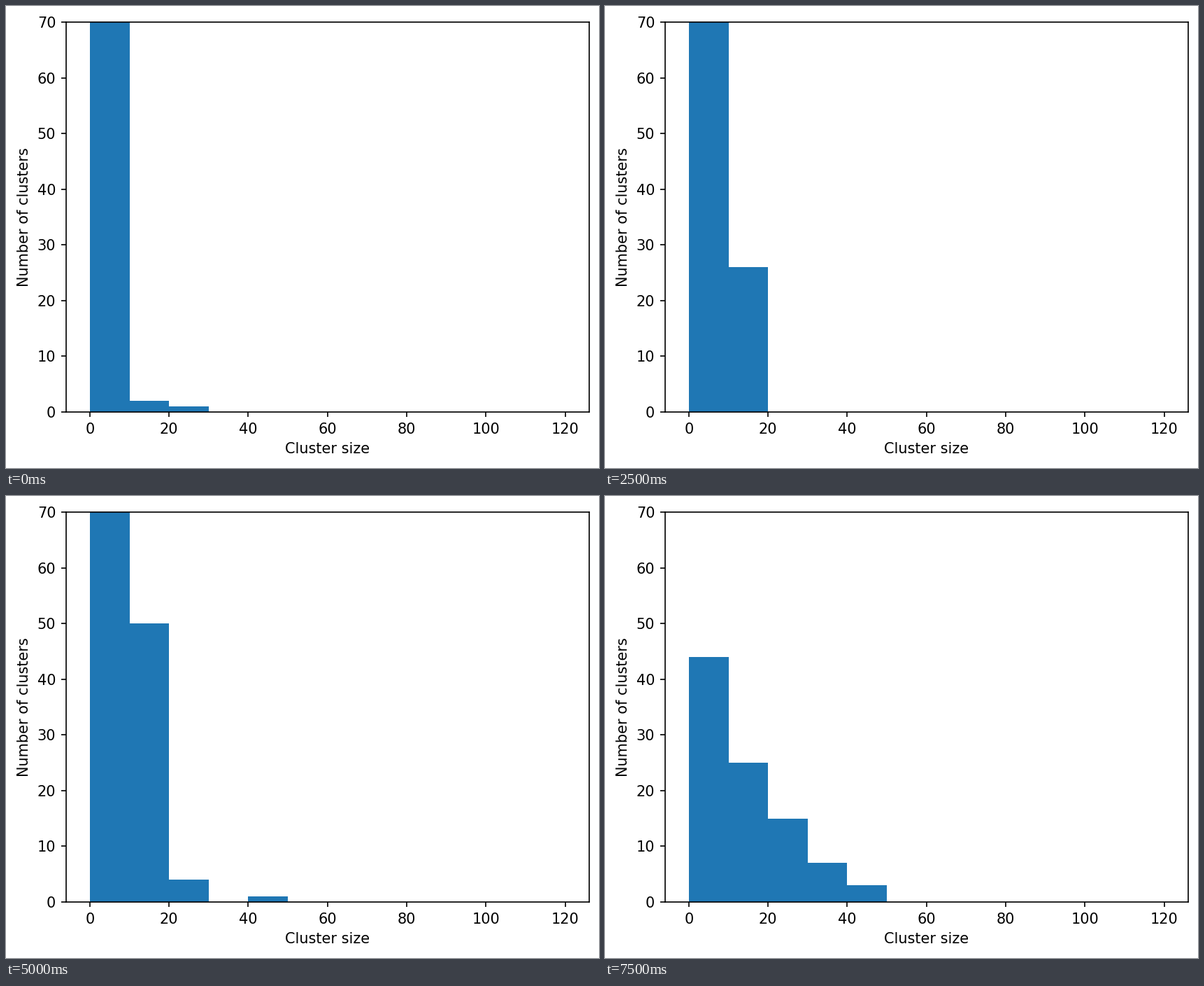
A matplotlib script for the animation above (8000 ms loop, 848 px wide and 660 px high).

```python
import matplotlib.pyplot as plt
from matplotlib.animation import FuncAnimation

W, H, DPI = 848, 660, 128
STEP_MS = 500
BIN = 10
FULL = 80  # taller than the axis, so the bar is clipped

# Cluster counts per bin (0-10, 10-20, ...), one row per step
COUNTS = [
    (FULL, 2, 1, 0, 0),
    (FULL, 7, 0, 0, 0),
    (FULL, 6, 0, 0, 0),
    (FULL, 13, 0, 0, 0),
    (FULL, 20, 0, 0, 0),
    (FULL, 26, 0, 0, 0),
    (FULL, 40, 2, 0, 0),
    (FULL, 38, 4, 0, 0),
    (FULL, 49, 1, 1, 0),
    (FULL, 52, 2, 0, 0),
    (FULL, 50, 4, 0, 1),
    (FULL, 53, 5, 1, 0),
    (65, 44, 9, 3, 2),
    (56, 36, 13, 5, 1),
    (44, 32, 14, 6, 2),
    (44, 25, 15, 7, 3),
]

K = 150.7 / DPI  # scale of text and line widths
plt.rcParams.update({
    "font.family": "DejaVu Sans",
    "font.size": 10 * K,
    "axes.linewidth": 0.8 * K,
    "axes.labelpad": 4 * K,
})
for axis in ("xtick", "ytick"):
    plt.rcParams.update({
        f"{axis}.major.size": 3.5 * K,
        f"{axis}.major.width": 0.8 * K,
        f"{axis}.major.pad": 3.5 * K,
    })

fig = plt.figure(figsize=(W / DPI, H / DPI), dpi=DPI, facecolor="white")
left, right, top, bottom = 86, 833.5, 23, 580
ax = fig.add_axes([left / W, 1 - bottom / H,
                   (right - left) / W, (bottom - top) / H])
ax.set(xlim=(-6, 126), ylim=(0, 70),
       xlabel="Cluster size", ylabel="Number of clusters")
ax.set_xticks(range(0, 121, 20))
ax.set_yticks(range(0, 71, 10))

edges = [BIN * i for i in range(len(COUNTS[0]))]
bars = ax.bar(edges, COUNTS[0], width=BIN, align="edge", color="#1f77b4")


def update(step):
    for bar, count in zip(bars, COUNTS[step]):
        bar.set_height(count)
    return list(bars)


anim = FuncAnimation(fig, update, frames=len(COUNTS), interval=STEP_MS,
                     repeat=True, repeat_delay=0, blit=False)
plt.show()
```
